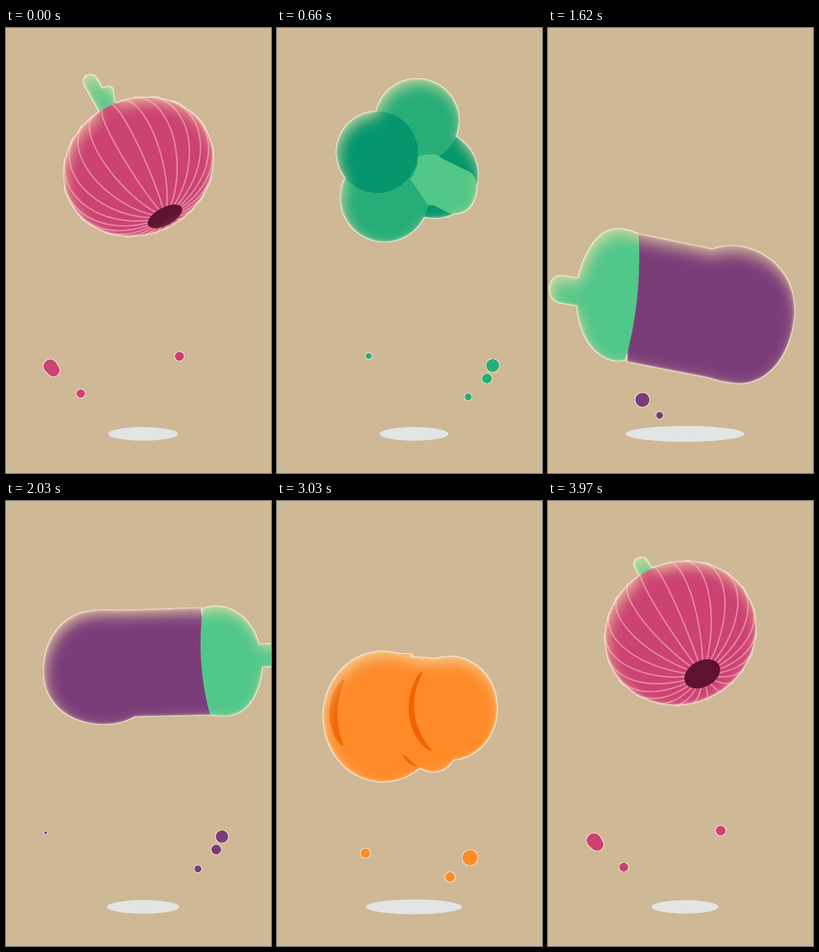
These frames come from a looping animation (474 px wide and 796 px high, 4010 ms). An HTML page without scripts:

```html
<!DOCTYPE html>
<html lang="en">
<head>
<meta charset="utf-8">
<title>Bouncing vegetables</title>
<style>
@property --t { syntax: '<angle>'; inherits: true; initial-value: 28deg; }

:root {
  --loop: 4010ms;
  --beat: calc(var(--loop) / 6);
  --start: calc(254ms - var(--beat));
}
html, body { margin: 0; width: 100%; height: 100%; overflow: hidden; background: #cfb896; }
svg { display: block; width: 474px; height: 796px; }

/* one slot per bounce */
.slot {
  animation: show var(--loop) step-end infinite;
  animation-delay: calc(254ms - var(--loop) + var(--i) * var(--beat));
}
@keyframes show { 0% { visibility: visible; } 16.6667%, 100% { visibility: hidden; } }

.shadow { animation: shade var(--beat) var(--start) infinite; }
@keyframes shade {
  0% { scale: 1.97 1.22; animation-timing-function: cubic-bezier(.333, .667, .667, 1); }
  50% { scale: 1 1; animation-timing-function: cubic-bezier(.333, 0, .667, .333); }
  100% { scale: 1.97 1.22; }
}

.hop { --x: 237px; animation: hop var(--beat) var(--start) infinite, stretch var(--beat) var(--start) linear infinite; }
@keyframes hop {
  0% { translate: var(--x) var(--low); animation-timing-function: cubic-bezier(.333, .667, .667, 1); }
  50% { translate: var(--x) var(--top); animation-timing-function: cubic-bezier(.333, 0, .667, .333); }
  100% { translate: var(--x) var(--low); }
}
@keyframes stretch { 0%, 100% { scale: 1 1.24; } 25%, 75% { scale: 1 1; } }

.spin { animation: spin var(--beat) var(--start) linear infinite; }
@keyframes spin { from { rotate: var(--from); } to { rotate: var(--to); } }

.turn { animation: turn var(--beat) var(--start) linear infinite; }
@keyframes turn { from { scale: .5 1; } to { scale: .95 1.04; } }

.calyx { animation: calyx var(--beat) var(--start) linear infinite; }
@keyframes calyx {
  0%, 56% { translate: 0 -125px; scale: 1 0; }
  69% { translate: 0 -102px; scale: 1 1; }
  85% { translate: 0 -28px; scale: 1 1.67; }
  100% { translate: 0 59px; scale: 1 1.5; }
}

/* onion: a spheroid rolling about its tilted cross axis by --t */
.onion { rotate: -28deg; animation: roll var(--beat) var(--start) linear infinite; }
@keyframes roll { from { --t: 190deg; } to { --t: -71deg; } }
.skin { transform: scale(137, hypot(115 * cos(var(--t)), 137 * sin(var(--t)))); }
.rib path {
  d: path("M0 -1A1 1 0 0 1 0 1");
  fill: none; stroke: #e386a3; stroke-width: 2.6px; vector-effect: non-scaling-stroke;
  transform:
    matrix(calc(137 * sin(var(--l))), calc(-137 * cos(var(--l)) * sin(var(--t))), 0, calc(115 * cos(var(--t))), 0, 0)
    rotate(atan2(137 * sin(var(--t)), 115 * cos(var(--l)) * cos(var(--t))));
}
.hole { transform: translateY(calc(114px * cos(var(--t)))) scaleY(max(.001, sin(var(--t)))); }
.stem { transform: scaleY(cos(var(--t))); }
.front { opacity: calc(-999 * sin(var(--t))); }

.drops circle {
  --lag: 0ms;
  animation: fly var(--beat) cubic-bezier(0, .85, .5, .95) infinite, shrink var(--beat) linear infinite;
  animation-delay: calc(var(--start) + var(--lag));
}
.drops .early { animation-name: fly, wane; }
.drops.late circle { --lag: 40ms; }
@keyframes fly { from { translate: 0 0; } to { translate: var(--x) var(--y); } }
@keyframes shrink { 0% { scale: .6; } 20% { scale: 1; } 60% { scale: .85; } 72% { scale: .66; } 88%, 100% { scale: 0; } }
@keyframes wane { 0% { scale: .85; } 30% { scale: .8; } 66% { scale: .28; } 72%, 100% { scale: 0; } }
</style>
</head>
<body>
<svg viewBox="0 0 474 796" xmlns="http://www.w3.org/2000/svg">
  <defs>
    <filter id="soft" filterUnits="userSpaceOnUse" x="-320" y="-320" width="640" height="640" color-interpolation-filters="sRGB">
      <feComponentTransfer in="SourceAlpha" result="out"><feFuncA type="table" tableValues="1 0"/></feComponentTransfer>
      <feGaussianBlur in="out" stdDeviation="12"/>
      <feOffset dx="4" dy="9" result="wide"/>
      <feFlood flood-color="#f0dba6" flood-opacity=".8"/>
      <feComposite in2="wide" operator="in"/>
      <feComposite in2="SourceAlpha" operator="in" result="glow"/>
      <feGaussianBlur in="out" stdDeviation="2" result="thin"/>
      <feFlood flood-color="#fff3dd" flood-opacity=".8"/>
      <feComposite in2="thin" operator="in"/>
      <feComposite in2="SourceAlpha" operator="in" result="rim"/>
      <feMorphology in="SourceAlpha" operator="dilate" radius="1" result="fat"/>
      <feFlood flood-color="#fff6ea"/>
      <feComposite in2="fat" operator="in" result="edge"/>
      <feMerge>
        <feMergeNode in="edge"/><feMergeNode in="SourceGraphic"/><feMergeNode in="glow"/><feMergeNode in="rim"/>
      </feMerge>
    </filter>
    <filter id="goo" filterUnits="userSpaceOnUse" x="-237" y="-260" width="474" height="330" color-interpolation-filters="sRGB">
      <feGaussianBlur stdDeviation="3"/>
      <feColorMatrix values="1 0 0 0 0  0 1 0 0 0  0 0 1 0 0  0 0 0 20 -9" result="blob"/>
      <feMorphology in="blob" operator="dilate" radius=".7" result="fat"/>
      <feFlood flood-color="#f7e6d2"/>
      <feComposite in2="fat" operator="in" result="edge"/>
      <feMerge><feMergeNode in="edge"/><feMergeNode in="blob"/></feMerge>
    </filter>
    <g id="eggplant">
      <path fill="#7b3d79" d="M-110-94L28-90Q50-101 76-101C140-101 187-62 187-8C187 58 145 103 90 103Q70 104 48 101L-100 98Z"/>
      <path fill="#52c78a" d="M-106-93Q-120-98-140-97C-178-94-198-55-204-13L-232-13A20.5 20.5 0 0 0-232 28L-200 28C-194 62-165 100-122 100Q-110 99-103 96Q-86 2-106-93Z"/>
    </g>
    <path id="stalk" fill="#55c88a" d="M-15-95L-17-200Q-14-212-5-212Q7-210 8-200L9-174L20-172Q26-168 24-160L17-140L17-95Z"/>
  </defs>

  <g transform="translate(245 726)"><ellipse class="shadow" rx="59" ry="12" fill="#e3e4e4"/></g>

  <!-- broccoli -->
  <g class="slot" style="--i:0">
    <g class="drops" transform="translate(237 715)" filter="url(#goo)" fill="#27ae78">
      <circle r="14" style="--x:159px;--y:-119px"/>
      <circle r="10.8" style="--x:148px;--y:-94px"/>
      <circle r="8.3" style="--x:112px;--y:-59px"/>
      <circle r="7.4" style="--x:-78px;--y:-137px"/>
    </g>
    <g class="hop" style="--top:222px;--low:532px" filter="url(#soft)">
      <g class="spin" style="--from:-142deg;--to:92deg">
        <circle cx="45" cy="25" r="78" fill="#05966d"/>
        <circle cx="-44" cy="67" r="79" fill="#27ae78"/>
        <circle cx="13" cy="-71" r="75" fill="#27ae78"/>
        <circle cx="-58" cy="-14" r="73" fill="#05966d"/>
        <path fill="#52c788" d="M15-5Q20-12 48-11Q52-9 58-4L108 20Q121 28 121 52Q114 95 80 95L70 93L44 80L34 80L2 34Q14 18 15-5Z"/>
      </g>
    </g>
  </g>

  <!-- eggplant, turning to its side -->
  <g class="slot" style="--i:1">
    <g class="drops" transform="translate(237 715)" filter="url(#goo)" fill="#7b3d79">
      <circle r="15" style="--x:170px;--y:-120px"/>
      <circle r="9.8" style="--x:110px;--y:-65px"/>
      <circle r="9.5" style="--x:-78px;--y:-136px"/>
    </g>
    <g class="hop" style="--x:254px;--top:246px;--low:546px" filter="url(#soft)">
      <g class="spin" style="--from:-20deg;--to:-4deg"><g class="turn"><use href="#eggplant"/></g></g>
    </g>
  </g>

  <!-- eggplant, tumbling -->
  <g class="slot" style="--i:2">
    <g class="drops" transform="translate(237 715)" filter="url(#goo)" fill="#7b3d79">
      <circle class="early" r="15" style="--x:-175px;--y:-128px"/>
      <circle class="early" r="8" style="--x:-120px;--y:-71px;--lag:12ms"/>
    </g>
    <g class="drops late" transform="translate(237 715)" filter="url(#goo)" fill="#7b3d79">
      <circle r="13.2" style="--x:160px;--y:-123px"/>
      <circle r="10.7" style="--x:149px;--y:-98px"/>
      <circle r="8" style="--x:114px;--y:-61px"/>
    </g>
    <g class="hop" style="--x:254px;--top:266px;--low:546px" filter="url(#soft)">
      <g class="spin" style="--from:-4.4deg;--to:271deg"><use href="#eggplant"/></g>
    </g>
  </g>

  <!-- tomato -->
  <g class="slot" style="--i:3">
    <g class="drops" transform="translate(237 715)" filter="url(#goo)" fill="#ff535b">
      <circle r="14" style="--x:-157px;--y:-121px"/>
      <circle r="11.2" style="--x:-147px;--y:-97px"/>
      <circle r="8.4" style="--x:-112px;--y:-60px"/>
      <circle class="early" r="9" style="--x:110px;--y:-134px"/>
      <circle class="early" r="6" style="--x:80px;--y:-62px"/>
    </g>
    <g class="hop" style="--x:241px;--top:237px;--low:547px" filter="url(#soft)">
      <ellipse rx="138" ry="125" transform="rotate(-8)" fill="#ff535b"/>
      <g class="calyx" fill="#57c98a" stroke="#57c98a" stroke-width="14" stroke-linejoin="round">
        <path d="M-53-2L-42 18L-32 13L-22 19L-12 14L0 18L8 8L25 10L24-4L14-6L8-9L-2-6L-10-21L-19-6L-29-6L-36-1Z"/>
      </g>
    </g>
  </g>

  <!-- potato -->
  <g class="slot" style="--i:4">
    <g class="drops" transform="translate(237 715)" filter="url(#goo)" fill="#ff8a28">
      <circle r="15" style="--x:170px;--y:-121px"/>
      <circle r="9.8" style="--x:114px;--y:-67px"/>
      <circle r="9.6" style="--x:-124px;--y:-134px"/>
    </g>
    <g class="hop" style="--x:233px;--top:230px;--low:540px" filter="url(#soft)">
      <g class="spin" style="--from:-169deg;--to:65deg">
        <g fill="#ff8a28">
          <circle cx="24" cy="-37" r="107"/>
          <circle cx="-47" cy="60" r="85"/>
          <path d="M-50-115L121 9L30 97L-105-2Z"/>
          <circle cx="-73" cy="-4" r="42"/>
          <circle cx="52" cy="52" r="18"/>
        </g>
        <g fill="#f26400">
          <path d="M-79-10C-38-34 29 8 32 63L28 62C15 20-20-12-79-10Z"/>
          <path d="M38-124C80-128 118-90 118-48L113-48C100-80 75-108 38-120Z"/>
          <path d="M-83-45C-70-54-55-58-46-54Q-50-50-58-50Q-70-50-83-45Z"/>
          <path d="M62 71Q74 64 79 54Q66 60 62 71Z"/>
        </g>
      </g>
    </g>
  </g>

  <!-- onion -->
  <g class="slot" style="--i:5">
    <g class="drops" transform="translate(237 715)" filter="url(#goo)" fill="#cc4272">
      <circle r="15" style="--x:-168px;--y:-117px"/>
      <circle r="13" style="--x:-163px;--y:-110px;--lag:15ms"/>
      <circle r="9.8" style="--x:-110px;--y:-65px"/>
      <circle r="10.5" style="--x:78px;--y:-136px"/>
    </g>
    <g class="hop" style="--top:232px;--low:502px" filter="url(#soft)">
      <g class="onion">
        <g class="stem"><use href="#stalk"/></g>
        <circle class="skin" r="1" fill="#cc4272"/>
        <g class="rib">
          <path style="--l:7.5deg"/><path style="--l:22.5deg"/><path style="--l:37.5deg"/><path style="--l:52.5deg"/>
          <path style="--l:67.5deg"/><path style="--l:82.5deg"/><path style="--l:97.5deg"/><path style="--l:112.5deg"/>
          <path style="--l:127.5deg"/><path style="--l:142.5deg"/><path style="--l:157.5deg"/><path style="--l:172.5deg"/>
        </g>
        <circle class="hole" r="34" fill="#5c1230"/>
        <g class="front"><g class="stem"><use href="#stalk"/></g></g>
      </g>
    </g>
  </g>
</svg>
</body>
</html>
```
